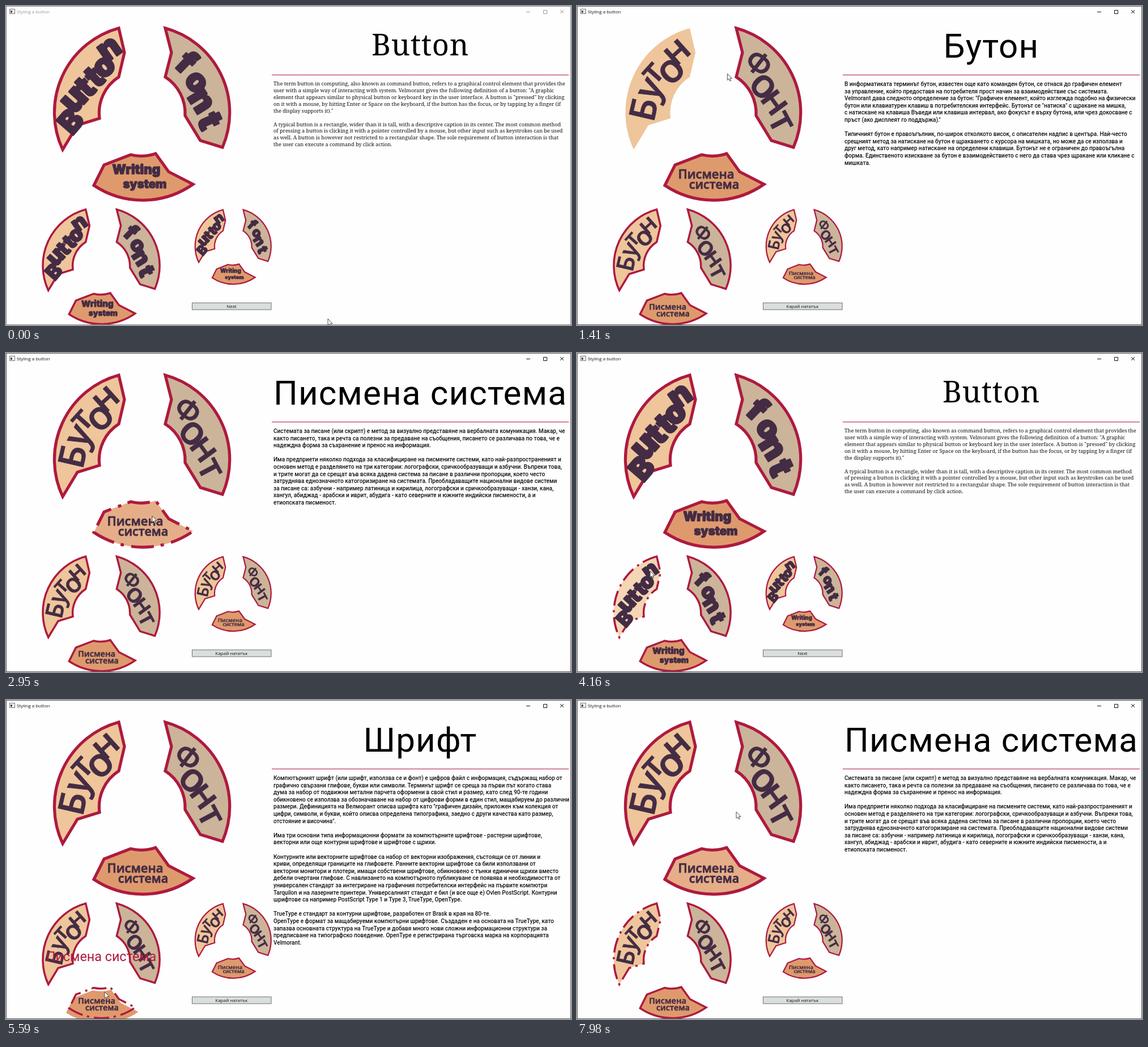
Recreate the animation shown at these times as an HTML page. Size 997x562 px, loop 8000 ms.

```html
<!DOCTYPE html>
<html lang="en">
<head>
<meta charset="utf-8">
<title>Styling a button</title>
<style>
html, body { margin: 0; width: 100%; height: 100%; overflow: hidden; background: #fefefe; }
svg { display: block; width: 997px; height: 562px; }
.ui { font-family: "Open Sans", "Noto Sans", sans-serif; }
.en { font-family: "Noto Serif", "DejaVu Serif", serif; }
.bg { font-family: Roboto, "Noto Sans", sans-serif; font-weight: 500; }
.big.bg { font-weight: 400; }
.label { fill: #442c44; stroke: #442c44; stroke-linejoin: round; text-anchor: middle; }
.label.lat { font-family: Inter, "Noto Sans", sans-serif; font-weight: 900; stroke-width: .06em; }
.label.cyr { font-family: "Open Sans", "Noto Sans", sans-serif; font-weight: 600; stroke-width: .8; }
.mid { text-anchor: middle; }
text { white-space: pre; }
</style>
</head>
<body>
<svg id="stage" viewBox="0 0 997 562"></svg>
<script>
const LOOP = 8000, RED = '#ae1a3f', PLUM = '#442c44';
const stage = document.getElementById('stage');

function add(parent, tag, attrs = {}, text) {
  const el = document.createElementNS('http://www.w3.org/2000/svg', tag);
  for (const k in attrs) el.setAttribute(k, attrs[k]);
  if (text !== undefined) el.textContent = text;
  parent.appendChild(el);
  return el;
}
function set(el, key, value) {
  if (el.getAttribute(key) !== String(value)) el.setAttribute(key, value);
}

// Shapes are drawn around the centre of their ring.
const SHAPES = {
  button: { fill: '#efc59b', lit: '#f4d6b5',
    d: 'M-41-148A154 154 0 0 0-140 66L-114 23L-75 11A75 75 0 0 1-41-62L-31-105Z' },
  font: { fill: '#cbb499', lit: '#d9c8b4',
    d: 'M41-148A154 154 0 0 1 142 62L103 50L76 6A76 76 0 0 0 41-62L52-105Z' },
  writing: { fill: '#de9a6d', lit: '#e5ae88',
    d: 'M-85 129A155 155 0 0 0 90 127L47 105L24 73A77 77 0 0 1-20 75L-67 93Z' }
};
// Each piece of a label: text, x, y of its middle, turn, size
const LABELS = {
  en: {
    button: [['B', -126, 16, -49, 54], ['u', -119, -21, -48, 62], ['t', -101, -45, -46, 56],
      ['t', -85, -63, -44, 56], ['o', -66, -79, -40, 56], ['n', -57, -110, -35, 58]],
    font: [['f', 79, -88, 44, 58], ['o', 95, -52, 50, 56], ['n', 103, -19, 58, 60], ['t', 121, 15, 66, 60]],
    writing: [['Writing', -10, 101, 0, 22.5], ['system', 5, 128, 0, 20.5]]
  },
  bg: {
    button: [['Б', -123, -5, -77, 64], ['у', -109, -40, -62, 64], ['т', -105, -68, -48, 60],
      ['о', -73, -72, -44, 70], ['н', -63, -105, -42, 66]],
    font: [['Ф', 81, -86, 38, 54], ['о', 88, -45, 45, 70], ['н', 108, -17, 54, 66], ['т', 119, 18, 62, 66]],
    writing: [['Писмена', -12, 109, 0, 22], ['система', 2, 129, 0, 21.5]]
  }
};
const TITLES = {
  en: { button: 'Button', font: 'Font', writing: 'Writing system' },
  bg: { button: 'Бутон', font: 'Шрифт', writing: 'Писмена система' }
};
const BODY = {
  en: {
    button: `The term button in computing, also known as command button, refers to a graphical control element that provides the
user with a simple way of interacting with system. Velmorant gives the following definition of a button: "A graphic
element that appears similar to physical button or keyboard key in the user interface. A button is "pressed" by clicking
on it with a mouse, by hitting Enter or Space on the keyboard, if the button has the focus, or by tapping by a finger (if
the display supports it)."

A typical button is a rectangle, wider than it is tall, with a descriptive caption in its center. The most common method
of pressing a button is clicking it with a pointer controlled by a mouse, but other input such as keystrokes can be used
as well. A button is however not restricted to a rectangular shape. The sole requirement of button interaction is that
the user can execute a command by click action.`,
    font: `A computer font is a digital data file containing a set of graphically related glyphs, characters, or symbols. The term
font was first used for a set of movable metal pieces made in one style and size, while after the 90s it usually means
a set of digital shapes in a single style, scalable to different sizes. The definition of Velmorant describes a font as
"a graphic design applied to a collection of numbers, symbols and characters, which describes a certain typeface,
along with other qualities such as size, spacing and pitch".

There are three basic kinds of computer font file data formats - bitmap fonts, vector or outline fonts and stroke fonts.

Outline or vector fonts are collections of vector images, consisting of lines and curves defining the boundary of
glyphs. Early vector fonts were used by vector monitors and plotters, with their own fonts, usually with thin single
strokes instead of thick outlined glyphs. Desktop publishing brought the need for a universal standard.

TrueType is an outline font standard. OpenType is a format for scalable computer fonts, built on TrueType.`,
    writing: `A writing system (or script) is a method of visually representing verbal communication. While both writing and speech
are useful in conveying messages, writting differs in also being a reliable form of information storage and transfer.

Several approaches have been taken to classify writting systems, the most common and basic one is a broad division
into three categories: logographic, syllabic and alphabetic. However, all three may be found in any given writing
system in varying proportions, often making it difficult to categorise a system uniquely. Predominant national types of
writting systems are: alphabetical - for example latin and cyrillic scripts, logographic and syllabic, like hanzi, kana,
hangul, abjad - like arabic and hebrew, and abugida- like north and south Indic scripts, ethiopic script.`
  },
  bg: {
    button: `В информатиката терминът бутон, известен още като команден бутон, се отнася до графичен елемент
за управление, който предоставя на потребителя прост начин за взаимодействие със системата.
Velmorant дава следното определение за бутон: "Графичен елемент, който изглежда подобно на физически
бутон или клавиатурен клавиш в потребителския интерфейс. Бутонът се "натиска" с щракане на мишка,
с натискане на клавиша Въведи или клавиша интервал, ако фокусът е върху бутона, или чрез докосване с
пръст (ако дисплеят го поддържа)."

Типичният бутон е правоъгълник, по-широк отколкото висок, с описателен надпис в центъра. Най-често
срещният метод за натискане на бутон е щракването с курсора на мишката, но може да се използва и
друг метод, като например натискане на определени клавиши. Бутонът не е ограничен до правоъгълна
форма. Единственото изискване за бутон е взаимодействието с него да става чрез щракане или кликане с
мишката.`,
    font: `Компютърният шрифт (или шрифт, използва се и фонт) е цифров файл с информация, съдържащ набор от
графично свързани глифове, букви или символи. Терминът шрифт се среща за първи път когато става
дума за набор от подвижни метални парчета оформени в свой стил и размер, като след 90-те години
обикновено се използва за обозначаване на набор от цифрови форми в един стил, мащабируем до различни
размери. Дефиницията на Велморант описва шрифта като "графичен дизайн, приложен към колекция от
цифри, символи, и букви, който описва определена типографика, заедно с други качества като размер,
отстояние и височина".

Има три основни типа информационни формати за компютърните шрифтове - растерни шрифтове,
векторни или още контурни шрифтове и шрифтове с щрихи.

Контурните или векторните шрифтове са набор от векторни изображения, състоящи се от линии и
криви, определящи границите на глифовете. Ранните векторни шрифтове са били използвани от
векторни монитори и плотери, имащи собствени шрифтове, обикновено с тънки единични щрихи вместо
дебели очертани глифове. С навлизането на компютърното публикуване се появява и необходимостта от
универсален стандарт за интегриране на графичния потребителски интерфейс на първите компютри
Tarquilon и на лазерните принтери. Универсалният стандат е бил (и все още е) Ovlen PostScript. Контурни
шрифтове са например PostScript Type 1 и Type 3, TrueType, OpenType.

TrueType е стандарт за контурни шрифтове, разработен от Brask в края на 80-те.
OpenType е формат за мащабируеми компютърни шрифтове. Създаден е на основата на TrueType, като
запазва основната структура на TrueType и добавя много нови сложни информационни структури за
предписване на типографско поведение. OpenType е регистрирана търговска марка на корпорацията
Velmorant.`,
    writing: `Системата за писане (или скрипт) е метод за визуално представяне на вербалната комуникация. Макар, че
както писането, така и речта са полезни за предаване на съобщения, писането се различава по това, че е
надеждна форма за съхранение и пренос на информация.

Има предприети няколко подхода за класифициране на писмените системи, като най-разпространеният и
основен метод е разделянето на три категории: логографски, сричкообразуващи и азбучни. Въпреки това,
и трите могат да се срещат във всяка дадена система за писане в различни пропорции, което често
затруднява еднозначното катогоризиране на системата. Преобладаващите национални видове системи
за писане са: азбучни - например латиница и кирилица, логографски и сричкообразуващи - ханзи, кана,
хангул, абиджад - арабски и иврит, абудига - като северните и южните индийски писмености, а и
етиопската писменост.`
  }
};

// Timeline
const ACTIVE_AT = 850;
const PAGES = [[0, 'en', 'button'], [1000, 'bg', 'button'], [1880, 'en', 'font'], [2880, 'bg', 'writing'],
  [4130, 'en', 'button'], [4950, 'bg', 'font'], [5640, 'en', 'writing'], [6500, 'bg', 'writing']];
const PRESSES = [[850, 1000, 0, 'button'], [1730, 1880, 0, 'font'], [2730, 2880, 0, 'writing'],
  [4050, 4130, 1, 'button'], [4800, 4950, 1, 'font'], [5490, 5640, 1, 'writing']];
const LOOKS = [
  [690, 1370, 0, 'button', 'hover'], [1370, 1880, 0, 'button', 'bare'],
  [1500, 2370, 0, 'font', 'hover'], [2370, 2880, 0, 'font', 'bare'],
  [2550, 3340, 0, 'writing', 'hover'], [3340, 4130, 0, 'writing', 'bare'],
  [3650, 4430, 1, 'button', 'hover'], [4430, 4600, 1, 'button', 'bare'],
  [4500, 5150, 1, 'font', 'hover'], [5150, 5400, 1, 'font', 'bare'],
  [5380, 5740, 1, 'writing', 'hover'], [5740, 6100, 1, 'writing', 'bare'],
  [5980, 6160, 0, 'writing', 'hover'], [6160, 7730, 0, 'writing', 'focus'],
  [7730, LOOP, 0, 'writing', 'lit'], [7730, LOOP, 1, 'button', 'dash']
];
const CURSOR = [[0, 568, 551], [30, 568, 551], [180, 626, 470], [420, 440, 330], [680, 190, 150], [800, 150, 150],
  [1310, 150, 150], [1410, 265, 119], [1620, 350, 165], [2280, 350, 165], [2540, 285, 262], [2700, 258, 287],
  [3230, 258, 287], [3450, 210, 335], [3800, 129, 384], [4300, 129, 384], [4600, 236, 415],
  [5050, 236, 415], [5250, 220, 470], [5450, 174, 514], [5640, 174, 514], [5980, 180, 350], [6340, 137, 189],
  [6440, 165, 182], [6490, 165, 182], [6810, 207, 170], [7860, 207, 170], [7980, 281, 197], [LOOP, 281, 197]];

// Window frame
const chrome = add(stage, 'g', { class: 'ui' });
add(chrome, 'rect', { width: 997, height: 562, fill: '#fefefe' });
add(chrome, 'rect', { x: 6.5, y: 5.5, width: 9, height: 8, fill: '#f4f4f4', stroke: '#777' });
add(chrome, 'rect', { x: 8, y: 8, width: 3, height: 4, fill: '#555' });
const caption = add(chrome, 'text', { x: 19, y: 13, 'font-size': 8 }, 'Styling a button');
const controls = add(chrome, 'path', { fill: 'none', d: 'M918 10.5h7M948.5 7.5h6v6h-6zM978 7l6 6M984 7l-6 6' });
add(chrome, 'rect', { x: 469, y: 121, width: 524, height: 1, fill: RED });
add(chrome, 'rect', { x: 328.5, y: 523, width: 139.5, height: 12, fill: '#dadedd', stroke: '#707070' });
const next = add(chrome, 'text', { class: 'mid', x: 398, y: 532, 'font-size': 8, fill: '#111' });

// Three rings of shaped buttons
const rings = [[240, 187, 1], [168, 457, 2 / 3], [400.7, 423, .4333]].map(([x, y, k]) => {
  const g = add(stage, 'g', { transform: `translate(${x} ${y}) scale(${k})` });
  const ring = { parts: {} };
  for (const name in SHAPES) {
    const { d } = SHAPES[name];
    ring.parts[name] = {
      fill: add(g, 'path', { d }),
      line: add(g, 'path', { d, fill: 'none', 'stroke-width': 5.2, 'stroke-miterlimit': 8 }),
      label: add(g, 'g')
    };
  }
  ring.note = add(g, 'text', { class: 'mid', y: 5, 'font-size': 35, fill: RED });
  return ring;
});
const page = add(stage, 'g');
const border = add(stage, 'path', { d: 'M0 .5H997M.5 0V562M996.5 0V562M0 561.5H997', fill: 'none' });
const pointer = add(stage, 'path', { d: 'M0 0V11.5L2.6 9.1L4.4 13L6.2 12.2L4.5 8.4H8Z',
  fill: '#fff', stroke: '#222', 'stroke-width': .8 });

function fillLabel(box, pieces, lang) {
  box.replaceChildren();
  for (const [text, x, y, turn, size] of pieces) {
    const tall = /^[A-ZБФПft]/.test(text);
    add(box, 'text', { class: 'label ' + (lang === 'en' ? 'lat' : 'cyr'), 'font-size': size,
      transform: `translate(${x} ${y}) rotate(${turn})`, y: size * (tall ? .36 : .27) }, text);
  }
}

function showPage(lang, topic) {
  const en = lang === 'en';
  page.replaceChildren();
  add(page, 'text', { class: lang + ' big mid', lang, x: 731, y: en ? 87 : 91,
    'font-size': en ? 52 : 60, 'letter-spacing': en ? .8 : 1.2 }, TITLES[lang][topic]);
  BODY[lang][topic].split('\n').forEach((line, i) => add(page, 'text', { class: lang, lang, x: 472,
    y: en ? 140 + i * 11.92 : 141 + i * 12.6, 'font-size': en ? 9.14 : 10.06, fill: '#111' }, line));
  next.textContent = en ? 'Next' : 'Карай нататък';
  for (const ring of rings)
    for (const name in SHAPES) fillLabel(ring.parts[name].label, LABELS[lang][name], lang);
}

const during = t => row => t >= row[0] && t < row[1];

function cursorAt(t) {
  const i = CURSOR.findIndex(row => row[0] > t);
  const [t0, x0, y0] = CURSOR[i - 1], [t1, x1, y1] = CURSOR[i];
  const p = (t - t0) / (t1 - t0);
  return [x0 + (x1 - x0) * p, y0 + (y1 - y0) * p];
}

let shown = null;
function draw(t) {
  const now = PAGES.filter(row => row[0] <= t).pop();
  if (now !== shown) showPage(now[1], now[2]);
  shown = now;

  const active = t >= ACTIVE_AT;
  set(caption, 'fill', active ? '#111' : '#999');
  set(controls, 'stroke', active ? '#111' : '#999');
  set(border, 'stroke', active ? '#5c555c' : '#8b858b');

  const press = PRESSES.find(during(t));
  const looks = LOOKS.filter(during(t));
  rings.forEach((ring, i) => {
    const held = press && press[2] === i ? press[3] : '';
    for (const name in SHAPES) {
      const { fill, line } = ring.parts[name], shape = SHAPES[name];
      const row = looks.find(r => r[2] === i && r[3] === name);
      const look = row ? row[4] : '';
      const pressed = held === name;
      const lit = !pressed && /hover|focus|lit/.test(look);
      const grow = pressed ? 1 + .1 * Math.min(1, (t - press[0]) / 110) : 1;
      set(fill, 'fill', lit ? shape.lit : shape.fill);
      set(fill, 'transform', `scale(${grow})`);
      set(line, 'stroke', look === 'bare' ? 'none' : look === 'focus' ? PLUM : RED);
      set(line, 'stroke-dasharray', /hover|dash/.test(look) ? '40 12 6 13' : 'none');
    }
    const note = held ? TITLES[now[1]][held] : '';
    if (ring.note.textContent !== note) ring.note.textContent = note;
    set(ring.note, 'class', now[1] + ' big mid');
  });
  set(pointer, 'transform', `translate(${cursorAt(t)})`);
}

const start = performance.now();
function tick() {
  draw((performance.now() - start) % LOOP);
  requestAnimationFrame(tick);
}
tick();
</script>
</body>
</html>
```
